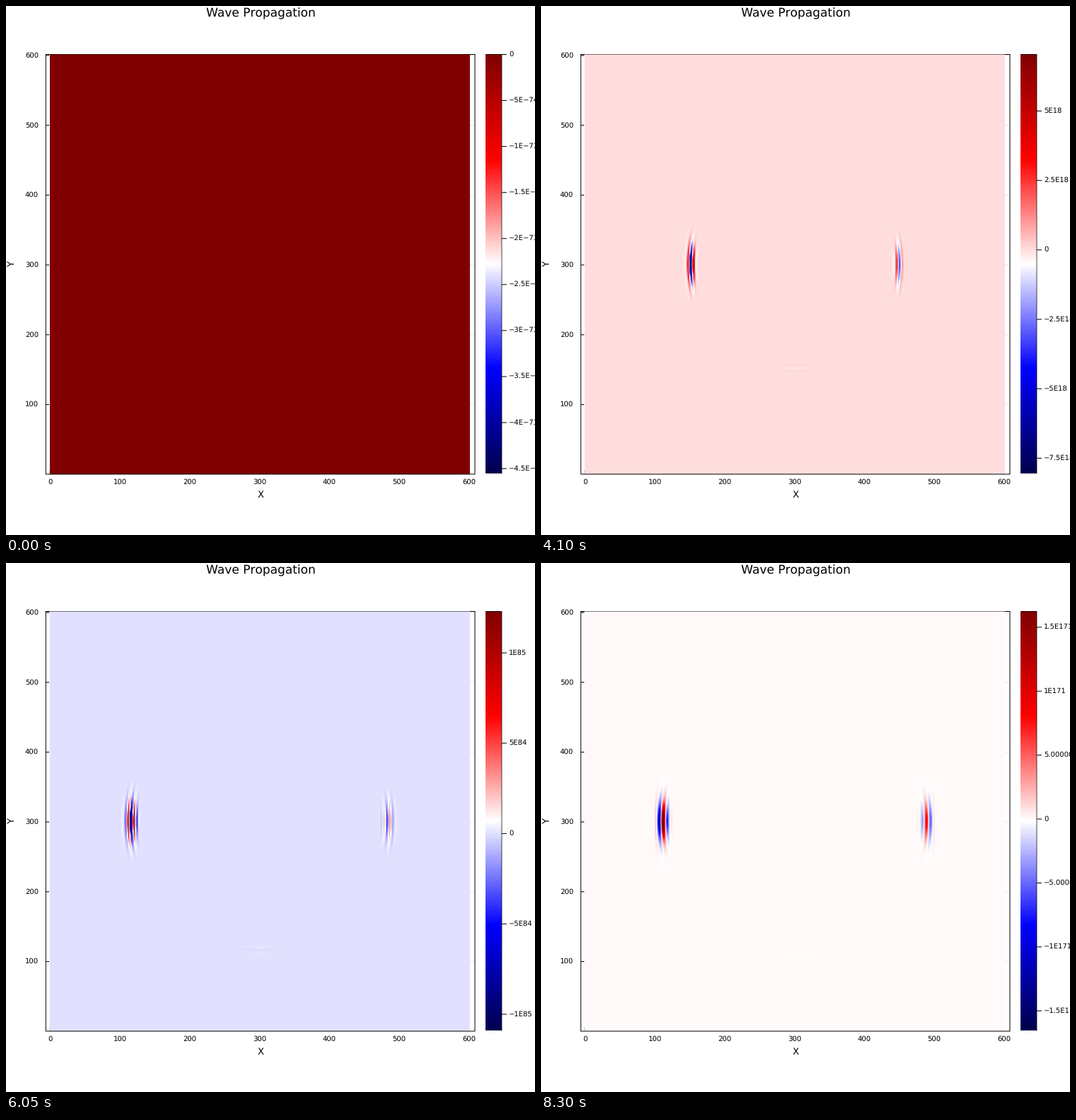
These frames come from a looping animation (748x748 px, 8.35 s). A matplotlib script:

```python
import numpy as np
import matplotlib.pyplot as plt
from matplotlib.animation import FuncAnimation

SIZE, DPI = 748, 88
FRAMES, INTERVAL = 167, 50
PX = 72 / DPI                      # points per pixel
N, MID = 601, 300                  # grid cells, centre cell
LEFT, RIGHT = 56.3, 663            # plot edges in pixels
TOP, BOTTOM = 68.5, 661.5
MINUS = "\u2212"

plt.rcParams.update({"font.family": "DejaVu Sans",
                     "text.hinting": "none", "text.hinting_factor": 1})

# Source pulse: rate, peak time in frames, wave speeds in cells per frame
RATE, PEAK = 0.78, 16.3
V_P, V_S = 3.44, 2.72


def pulse(r, t, speed):
    x = RATE * (t - PEAK - r / speed) / (1 + 0.0025 * r)
    return (1 - 2 * x**2 + 1.2 * (4 * x**3 - 6 * x)) * np.exp(-x**2)


def rings(n):
    """P and S fronts of a horizontal point force on a centred square."""
    half = int(20 + 4 * max(n - PEAK, 0))
    c = np.arange(-half, half + 1.0)
    x, y = np.meshgrid(c, c)
    r = np.hypot(x, y)
    cos2 = np.where(r > 0, x**2 / np.maximum(r, 1)**2, 1)
    u = 0.8 * cos2 * pulse(r, n, V_P) + (1 - cos2) * pulse(r, n, V_S)
    u *= np.exp(-r / 65) / np.sqrt(r + 1)
    return u, min(u.min(), 0), max(u.max(), 0)


def log_raw(n):
    _, lo, hi = rings(n)
    return np.log10(hi - lo)


RING_FIX = [np.log10(4.557e-73) - log_raw(0), np.log10(2.01e-7) - log_raw(36)]

# Growth of the unstable modes, as log10 of the value range
GROW_T = np.array([60, 82, 107, 133, 166])
GROW = np.polyfit((GROW_T - 110) / 50,
                  np.log10([4.9e-6, 1.51e19, 1.724e60, 1.92e107, 3.28e171]), 4)

KEYS = [60, 82, 107, 133, 155]


def key(n, *vals):
    return np.interp(n, KEYS, vals)


def zero_level(n):
    """Height of zero in the colour range, 0 to 1."""
    return np.interp(n, [30, 55, 60, 82, 107, 133, 150],
                     [.434, .434, .483, .534, .584, .373, .505])


def packet(view, n, amp, shift=0.0):
    """Add a striped packet on the positive side of the last axis of view."""
    if amp <= 0:
        return
    dist = np.interp(n, [50, 60, 107, 127], [118, 127.5, 171, 189.5])
    width = key(n, 4, 5, 6, 7.5, 7)
    height = key(n, 32, 24, 24, 25, 25)
    wave = key(n, 9, 9, 8, 9, 13)
    turn = np.pi * key(n, -0.5, 6.8, 16, 25, 32.15)
    fine = key(n, .35, .35, .5, .5, 0)
    lo, hi = int(dist) - 26, min(int(dist) + 27, 201)
    cols = np.arange(lo, hi)
    x = cols - dist
    y = np.arange(-130.0, 131)[:, None]
    bend = x + 0.7 * y**2 / (2 * dist)
    env = np.exp(-(x / width)**2 - (y / height)**2)
    comb = 1 + fine * (1 - 2 * (cols % 2))
    view[MID - 130:MID + 131, MID + lo:MID + hi] += (
        amp * env * comb * np.cos(2 * np.pi * bend / wave + turn + shift))


def field(n):
    """Field scaled to a range of one, its true range and zero level."""
    u = np.zeros((N, N))
    ring_span = grow_span = 0.0
    zero = zero_level(n)
    if n <= 70:
        ring, lo, hi = rings(n)
        raw = hi - lo
        ring_span = 10 ** (np.log10(raw) + np.interp(n, [0, 36], RING_FIX))
        if n < 30:
            zero = -lo / raw
    if n >= 50:
        grow_span = 10 ** np.polyval(GROW, (n - 110) / 50)
    span = max(ring_span, grow_span)
    if ring_span:
        h = min(len(ring) // 2, MID)
        cut = len(ring) // 2 - h
        part = ring[cut:len(ring) - cut, cut:len(ring) - cut]
        u[MID - h:MID + h + 1, MID - h:MID + h + 1] = part / raw * (ring_span / span)
    if grow_span:
        g = 0.62 * grow_span / span
        packet(u[:, ::-1], n, g)
        packet(u, n, g * key(n, .8, .4, .22, .3, .45), key(n, np.pi, -.7, 2, 1, 0))
        packet(u.T[:, ::-1], n, g * key(n, .03, .012, .01, .012, .004))
        packet(u.T, n, g * key(n, .03, 0, 0, 0, 0))
    return u, span, zero


def tick_step(span):
    mag = 10.0 ** np.floor(np.log10(span))
    m = span / mag
    return mag * (0.25 if m < 2 else 0.5 if m < 5 else 1)


def label(v, step):
    if v == 0:
        return "0"
    if 1e-9 < step < 1e6:
        text = f"{v:.12f}".rstrip("0").rstrip(".")
    else:
        m, e = f"{v:.3e}".split("e")
        long = int(e) > 99 and abs(float(m)) >= 5
        m = m + "0" * 12 if long else m.rstrip("0").rstrip(".")
        text = f"{m}E{int(e)}"
    return text.replace("-", MINUS)


fig = plt.figure(figsize=(SIZE / DPI, SIZE / DPI), dpi=DPI, facecolor="white")
ax = fig.add_axes([0, 0, 1, 1])
ax.axis("off")


def line(xs, ys, z=3, **kw):
    ax.plot(xs, ys, color="black", lw=PX, zorder=z, snap=False,
            solid_capstyle="butt", **kw)


def text(x, y, s, px=10, ha="center", va="center", **kw):
    return ax.text(x, y, s, fontsize=px * PX, ha=ha, va=va, **kw)


# Axes: grid and ticks lie under the heat map
for v in range(0, 601, 100):
    x, y = 62.3 + 0.9877 * v, 662.3 - 0.9873 * v
    line([x, x], [TOP, BOTTOM], z=1, alpha=0.1)
    line([x, x], [BOTTOM - 5, BOTTOM], z=1)
    text(x, 673.5, str(v))
    if v:
        line([LEFT, RIGHT], [y, y], z=1, alpha=0.1)
        line([LEFT, 61], [y, y], z=1)
        text(46, y, str(v), ha="right")
line([LEFT, LEFT, RIGHT, RIGHT], [TOP, 662, 662, TOP])
line([LEFT - 0.5, RIGHT + 0.5], [TOP, TOP], z=1)
line([62.5, 656], [TOP, TOP], alpha=0.5)
text(360.5, 15, "Wave Propagation", 17.2, va="baseline")
text(360, 691.5, "X", 13.5)
text(8.5, 365.5, "Y", 13.5, rotation=90)

look = dict(cmap="seismic", origin="lower", aspect="auto", interpolation="nearest")
heat = ax.imshow(np.zeros((N, N)), extent=(62.5, 656, 662, TOP), zorder=2, **look)
ax.imshow(np.linspace(0, 1, 256)[:, None], extent=(678.5, 701, BOTTOM, TOP),
          zorder=2, **look)
line([678.5, 701, 701], [TOP, TOP, BOTTOM], alpha=0.7)
bar_ticks = ax.hlines([], 701, 708, color="black", lw=PX, snap=False)
bar_text = [text(711, 0, "", ha="left") for _ in range(14)]
ax.set_xlim(0, SIZE)
ax.set_ylim(SIZE, 0)


def draw(n):
    u, span, zero = field(n)
    heat.set_data(u)
    heat.set_clim(-zero, 1 - zero)

    step = tick_step(span)
    first = int(np.ceil(-zero * span / step - 1e-6))
    last = int(np.floor((1 - zero) * span / step + 1e-6))
    ks = list(range(first, last + 1))[:len(bar_text)]
    ys = [BOTTOM - (BOTTOM - TOP) * (zero + k * step / span) for k in ks]
    bar_ticks.set_segments([[(701, y), (708, y)] for y in ys])
    for t in bar_text:
        t.set_text("")
    for t, k, y in zip(bar_text, ks, ys):
        t.set_text(label(k * step, step))
        t.set_y(y - 0.4)
    return ()


anim = FuncAnimation(fig, draw, frames=FRAMES, interval=INTERVAL, repeat=True)
plt.show()
```
